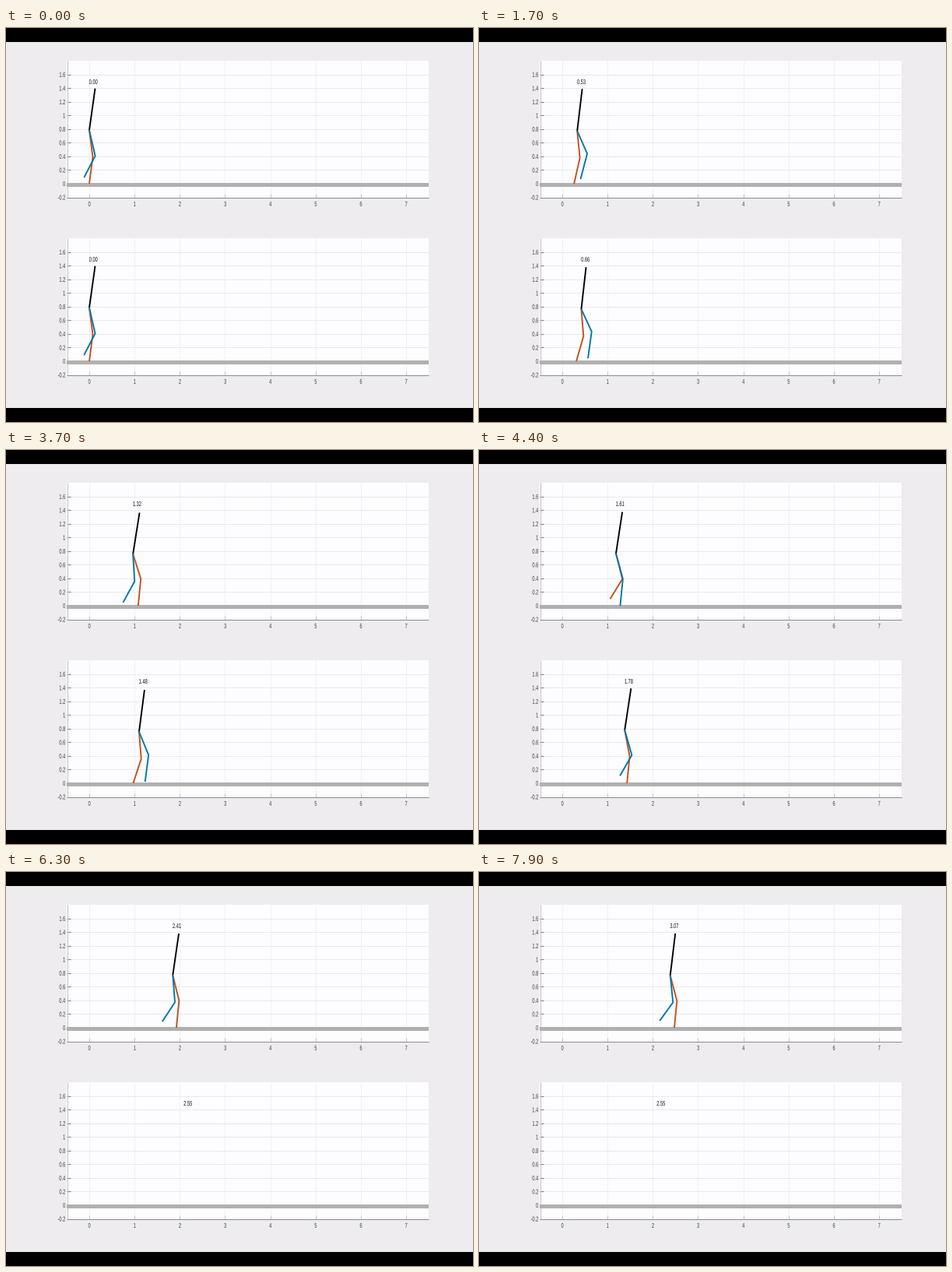
Write a matplotlib script that moves like this. It is 600 by 506 pixels and loops after 8 s.

```python
import numpy as np
import matplotlib.pyplot as plt
from matplotlib.animation import FuncAnimation
from matplotlib.patches import PathPatch, Rectangle
from matplotlib.textpath import TextPath
from matplotlib.transforms import Affine2D

W, H, DPI = 600, 506, 64           # a power of two keeps W / DPI and H / DPI exact
FRAMES, INTERVAL = 80, 100
LEFT, RIGHT = 78, 543
X0, SX, SY = 107, 58.15, 87.6      # stage position of x = 0, pixels per unit
LEG, TORSO = 0.40, 0.625
ORANGE, BLUE = "#c4501c", "#0076a8"
FONT_PX, ASPECT = 8.6, 0.66        # the whole plot is shown horizontally condensed
FALL, GONE = 51, 63

plt.rcParams["path.simplify"] = False
fig = plt.figure(figsize=(W / DPI, H / DPI), dpi=DPI, facecolor="#eeecee")
ax = fig.add_axes([0, 0, 1, 1])
ax.set_xlim(0, W)
ax.set_ylim(H, 0)
ax.axis("off")


def px(n):
    return n * 72 / DPI


def box(x, y, w, h, color, z):
    patch = Rectangle((x, y), w, h, fc=color, ec="none", lw=0, zorder=z)
    return ax.add_patch(patch)


def rule(xs, ys, color, z, width=1.0):
    ax.plot(xs, ys, color=color, lw=px(width), zorder=z, solid_capstyle="butt")


def glyphs(s, x, y, align=0.0):
    """Outline of s, centred on y; align 0 = left, 0.5 = centre, 1 = right."""
    path = TextPath((0, 0), s, size=FONT_PX, prop={"family": "Liberation Sans"})
    width = path.get_extents().x1 * ASPECT
    shift = Affine2D().scale(ASPECT, -1).translate(x - align * width, y + 0.35 * FONT_PX)
    return shift.transform_path(path)


def label(s, x, y, align=0.0, color="#3c3c3c"):
    patch = PathPatch(glyphs(s, x, y, align), fc=color, ec="none", lw=0, zorder=6)
    return ax.add_patch(patch)


def curve(t, keys):
    """Cubic Hermite curve through (time, value) keys."""
    ts, vs = np.array(keys, float).T
    t = np.clip(t, ts[0], ts[-1])
    m = np.gradient(vs, ts)
    k = min(np.searchsorted(ts, t, side="right") - 1, len(ts) - 2)
    d = ts[k + 1] - ts[k]
    u = (t - ts[k]) / d
    return ((1 + 2 * u) * (1 - u) ** 2 * vs[k] + u * (1 - u) ** 2 * d * m[k]
            + u * u * (3 - 2 * u) * vs[k + 1] + u * u * (u - 1) * d * m[k + 1])


def foot(t, contacts):
    """Foot position from a list of (landing, lift-off, x) contacts."""
    for (_, lift, x), (land, _, nxt) in zip(contacts, contacts[1:]):
        if t <= lift:
            return x, 0.0
        if t < land:
            s = (t - lift) / (land - lift)
            g = -1.6 * s + 6.8 * s ** 2 - 4.2 * s ** 3
            return x + (nxt - x) * g, 0.11 * np.sin(np.pi * s ** 0.7)
    return contacts[-1][2], 0.0


def leg(hip, toe):
    """Hip, knee and foot, with the knee bent forward."""
    hip, toe = np.array(hip), np.array(toe)
    v = toe - hip
    d = np.hypot(*v)
    if d > 2 * LEG:
        v *= 2 * LEG / d
        d = 2 * LEG
    bend = np.sqrt(max(LEG ** 2 - d * d / 4, 0))
    knee = hip + v / 2 + bend * np.array([-v[1], v[0]]) / d
    return np.array([hip, knee, hip + v])


class Walker:
    def __init__(self, base, clock, hip, lean, dip, orange, blue, fall=None):
        self.base, self.clock, self.hip, self.lean = base, clock, hip, lean
        self.dip, self.fall = dip, fall
        self.contacts = [orange, blue]
        self.draw_axes()
        clip = Rectangle((LEFT, base - 158), RIGHT - LEFT, 176, transform=ax.transData)
        self.lines = []
        for color, z in ((ORANGE, 4), (BLUE, 4.2), ("black", 4.1)):
            line, = ax.plot([], [], color=color, lw=px(1.9), zorder=z,
                            solid_capstyle="butt", solid_joinstyle="round")
            line.set_clip_path(clip)
            self.lines.append(line)
        self.text = label("0.00", X0, base - 131, color="#101010")

    def draw_axes(self):
        top, bottom = self.base - 158, self.base + 17.5
        box(LEFT, top, RIGHT - LEFT, bottom - top, "#fdfcfe", 1)
        for k in range(8):
            x = X0 + SX * k
            rule([x, x], [top, bottom], "#f1f0f2", 2)
            rule([x, x], [bottom - 5, bottom], "#c4c4c4", 3)
            label(str(k), x, self.base + 25.8, 0.5)
        for k in range(-1, 9):
            y = self.base - SY * 0.2 * k
            if k >= 0:
                rule([LEFT, RIGHT], [y, y], "#e9e8ea", 2)
                rule([LEFT, LEFT + 5], [y, y], "#7c7c7c", 3)
            label(f"{0.2 * k:.1f}".replace("0.0", "0").replace("1.0", "1"), 76, y, 1)
        rule([LEFT + 0.5] * 2, [top, bottom], "#c0c0c0", 3)
        rule([LEFT, RIGHT], [bottom, bottom], "#8c8c8c", 3)
        box(LEFT, self.base - 0.7, RIGHT - LEFT, 4.9, "#b0b0b0", 3.5)

    def pose(self, t):
        x = curve(t, self.hip)
        if self.fall and t >= FALL:
            y, *toes = [curve(t, k) for k in self.fall]
            toes = [toes[:2], toes[2:]]
        else:
            gap = min(abs(x - c[2]) for side in self.contacts for c in side)
            y = 0.785 - self.dip * min(gap, 0.14) ** 2
            toes = [foot(t, side) for side in self.contacts]
        lean = min(curve(t, self.lean), 0.62)
        head = (x + lean, y + np.sqrt(TORSO ** 2 - lean ** 2))
        return [leg((x, y), toe) for toe in toes] + [np.array([(x, y), head])]

    def draw(self, i):
        t = min(i, GONE - 1) if self.fall else i
        shown = not self.fall or i < GONE
        parts = self.pose(t)
        for line, pts in zip(self.lines, parts):
            line.set_data(X0 + SX * pts[:, 0], self.base - SY * pts[:, 1])
            line.set_visible(shown)
        time = np.interp(t, *np.array(self.clock).T)
        hip_x = X0 + SX * parts[2][0, 0]
        self.text.set_path(glyphs(f"{time:.2f}", hip_x - 0.3, self.base - 131))


box(0, 0, W, 18, "black", 1)
box(0, 488, W, 18, "black", 1)

steady = Walker(
    200,
    clock=[(0, 0), (17, .53), (28, .96), (37, 1.32), (51, 1.91), (63, 2.41), (79, 3.07)],
    hip=[(0, 0), (17, .33), (28, .655), (37, .965), (51, 1.41), (63, 1.845), (79, 2.385)],
    lean=[(0, .129), (17, .11), (28, .12), (37, .145), (51, .13), (63, .133), (79, .112)],
    dip=2.2,
    orange=[(-6, 7.5, 0), (13, 19.2, .26), (24, 30.2, .6), (36.4, 42.5, 1.08),
            (49.2, 56, 1.455), (61.4, 70, 1.925), (77, 85, 2.475)],
    blue=[(-9, -1.7, -.09), (7.2, 12.9, .2), (18.7, 24, .46), (30.1, 36.65, .785),
          (42.2, 49.6, 1.28), (55.8, 61.6, 1.66), (69.5, 77.3, 2.178), (84.3, 90, 2.72)],
)

falling = Walker(
    428,
    clock=[(0, 0), (17, .66), (28, 1.12), (37, 1.48), (51, 2.08), (62, 2.55)],
    hip=[(0, 0), (17, .42), (28, .78), (37, 1.10), (51, 1.665), (62, 2.09)],
    lean=[(0, .129), (17, .105), (28, .114), (37, .12), (46, .16), (51, .252),
          (54, .37), (58, .53), (62, .6)],
    dip=1.75,
    orange=[(-6, 7.8, 0), (12.4, 18, .31), (22.6, 28.5, .645), (32, 37.6, .97),
            (42, 50.5, 1.43), (56, 60, 1.7)],
    blue=[(-9, -1.7, -.09), (7.4, 12.5, .2), (18, 22.7, .59), (28.5, 32, .925),
          (37.5, 42.2, 1.23), (47, 60, 1.565)],
    fall=[
        [(51, .765), (54, .71), (58, .5), (62, .15)],
        [(51, 1.41), (54, 1.34), (58, 1.36), (62, 1.52)],
        [(51, .045), (54, .07), (58, .03), (62, -.1)],
        [(51, 1.565), (54, 1.575), (58, 1.68), (62, 1.85)],
        [(51, .005), (54, -.06), (58, -.14), (62, -.22)],
    ],
)


def update(i):
    steady.draw(i)
    falling.draw(i)
    return []


anim = FuncAnimation(fig, update, frames=FRAMES, interval=INTERVAL,
                     repeat=True, repeat_delay=0, blit=False)
plt.show()
```
